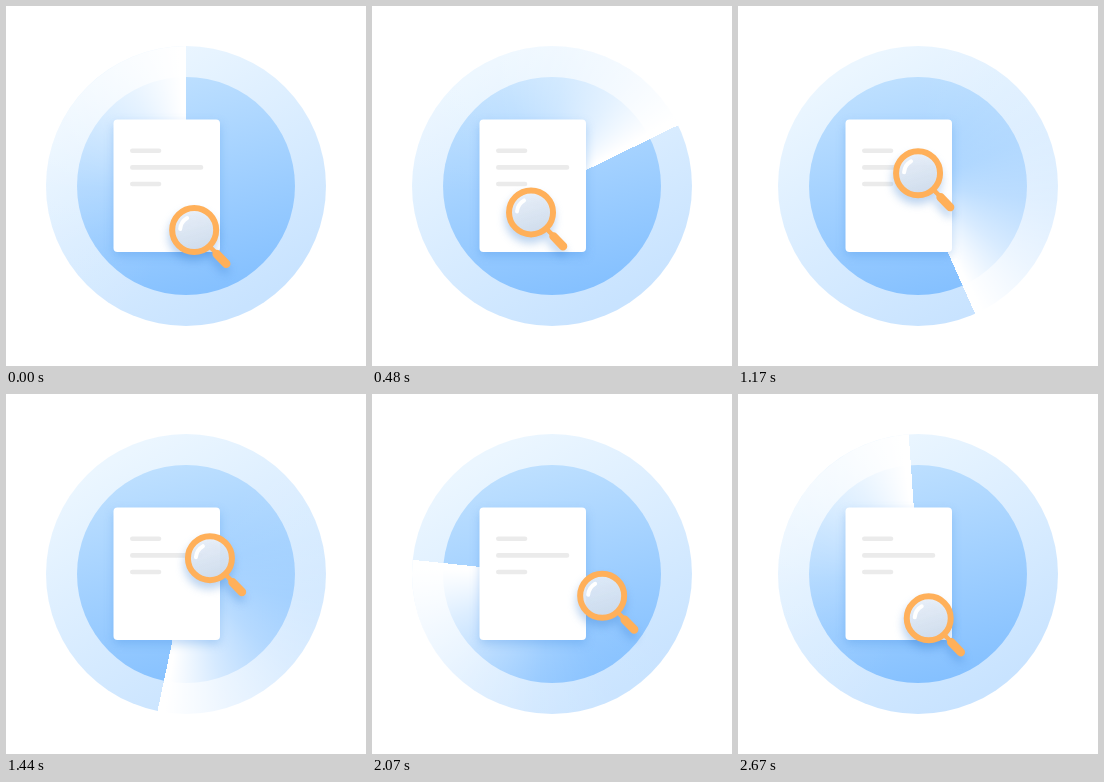
An HTML page for the animation above (2700 ms loop, 360 px wide and 360 px high).

```html
<!DOCTYPE html>
<html lang="en">
<head>
<meta charset="utf-8">
<title>Searching</title>
<style>
  html, body { margin: 0; width: 100%; height: 100%; overflow: hidden; background: #fff; }
  .disc { position: absolute; border-radius: 50%; }
  #outer { left: 40px; top: 40px; width: 280px; height: 280px; background: linear-gradient(150deg, #ebf6ff 15%, #c8e3ff 85%); }
  #inner { left: 71px; top: 71px; width: 218px; height: 218px; background: linear-gradient(165deg, #c2e2ff 2%, #84c0ff 92%); }
  #sweep {
    left: 39.5px; top: 39.5px; width: 281px; height: 281px;
    background: conic-gradient(#fff0 200deg, #ffffff0d 240deg, #ffffff26 270deg, #ffffff59 300deg, #ffffffa6 330deg, #fff 357deg);
  }
  svg { position: absolute; left: 0; top: 0; }
  #page { filter: drop-shadow(0 4px 5px #3c8ce04d); }
  #glass { filter: drop-shadow(-1px 6px 4px #3c82d059); }
</style>
</head>
<body>
<div class="disc" id="outer"></div>
<div class="disc" id="inner"></div>
<div class="disc" id="sweep"></div>
<svg width="360" height="360" viewBox="0 0 360 360">
  <defs>
    <linearGradient id="lens" x1=".3" y1="0" x2=".6" y2="1">
      <stop offset="0" stop-color="#eef3fa" stop-opacity=".85"/>
      <stop offset="1" stop-color="#cfdcec" stop-opacity=".95"/>
    </linearGradient>
  </defs>
  <rect id="page" x="107.5" y="113.5" width="106.5" height="132.5" rx="4" fill="#fff"/>
  <path d="M126.3 144.8H153M126.3 161.4H195M126.3 178H153" stroke="#ebebeb" stroke-width="4.6" stroke-linecap="round"/>
  <g id="glass" fill="none" stroke="#ffb05a" stroke-linecap="round">
    <path d="M15 16L24 25" stroke-width="4.5"/>
    <path d="M22.5 24L32 33.8" stroke-width="8.5"/>
    <circle r="22" fill="url(#lens)" stroke-width="6"/>
    <path d="M-14 -1A14 14 0 0 1 -7 -12" stroke="#fff" stroke-width="4"/>
  </g>
</svg>
<script>
  const LOOP = 2700, STEP = 30;
  const sweep = document.getElementById('sweep');
  const glass = document.getElementById('glass');
  const start = performance.now();

  // half-sine pulse between two times
  const pulse = (t, from, to) => t > from && t < to ? Math.sin(Math.PI * (t - from) / (to - from)) : 0;

  function draw(now) {
    const t = Math.floor(Math.max(0, now - start) % LOOP / STEP) * STEP;
    const turn = t / LOOP * 360;
    const a = (turn + 10) * Math.PI / 180;
    const x = 194.6 - 37 * Math.sin(a) - 5.6 * pulse(t, 600, 1800);
    const y = 193.1 + 31.4 * Math.cos(a) + 7.2 * pulse(t, 200, 1450);
    sweep.style.transform = `rotate(${turn}deg)`;
    glass.setAttribute('transform', `translate(${x} ${y})`);
    requestAnimationFrame(draw);
  }
  draw(start);
</script>
</body>
</html>
```
